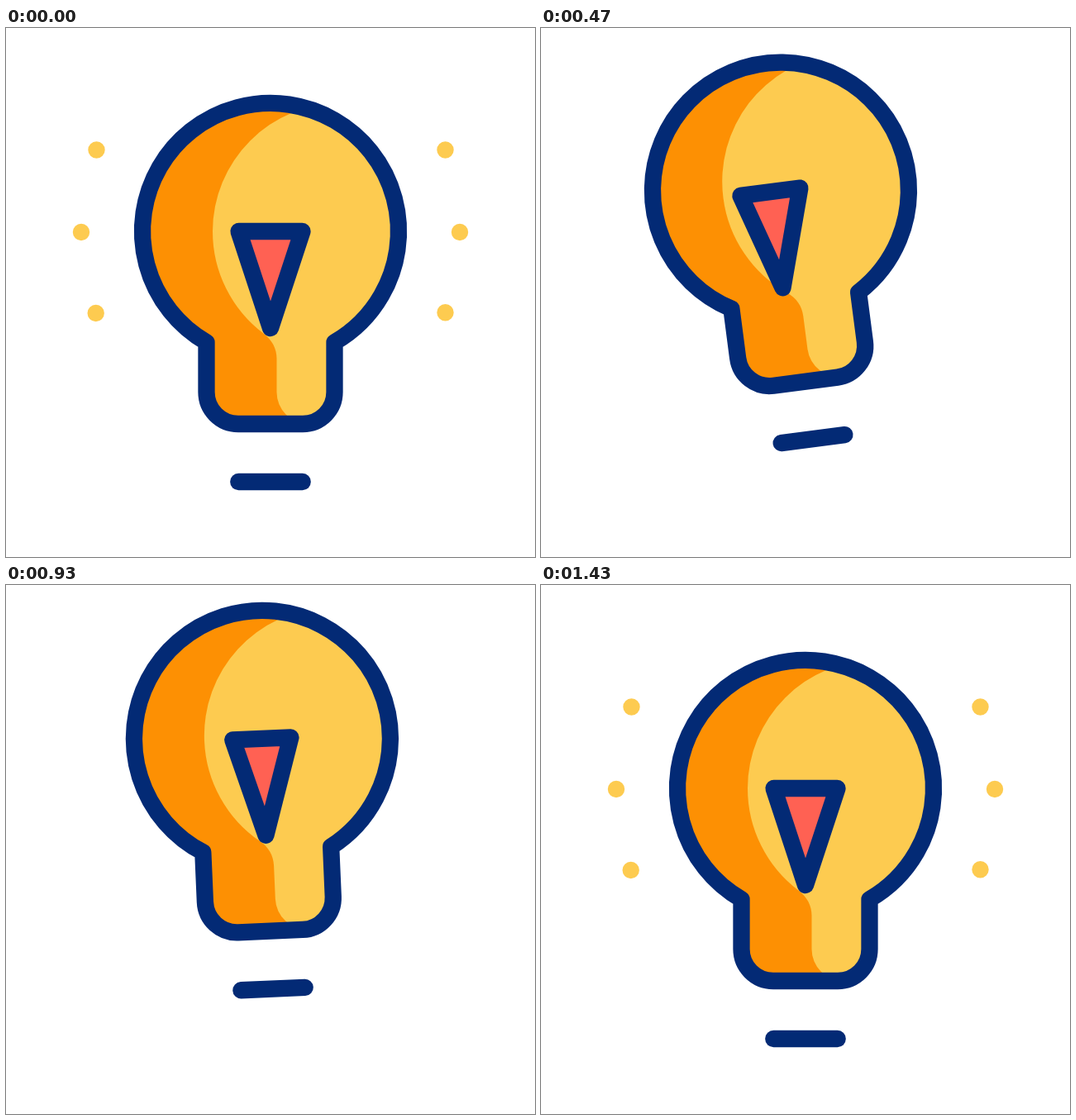
An HTML page with a canvas that plays this animation: 640 by 640 pixels, repeating every 1.67 s.

```html
<!DOCTYPE html>
<html lang="en">
<head>
<meta charset="utf-8">
<title>Light bulb</title>
<style>
html, body { margin: 0; width: 100%; height: 100%; overflow: hidden; background: #fff; }
canvas { display: block; width: 640px; height: 640px; }
</style>
</head>
<body>
<canvas id="stage" width="640" height="640"></canvas>
<script>
const ctx = document.getElementById('stage').getContext('2d');
const LOOP = 1670, FPS = 30, BLINK = 50 / 7;
const NAVY = '#032a75', YELLOW = '#fdcb50', ORANGE = '#fd9003', RED = '#ff6153';
const CX = 320, CY = 246, RADIUS = 155, BASE = 479, NECK = 77.5, CORNER = 38.5;

// Keys are [frame, value] pairs, eased in and out between neighbours.
const lift = [[0, 0], [10.8, -59.5], [11.4, -59.5], [21.5, 0], [29.5, -65], [43, 0]];
const tilt = [[0, 0], [7.6, -8.3], [12.9, -8.3], [19.4, 7], [25.8, -3.9], [32, 1.52], [43, 0]];
const flip = [[0, 1], [15.9, -1], [30.1, 1]];
const slide = [[0, 0], [15.9, -13], [30.1, 0]];

const dots = [[109.5, 147.5], [91, 247], [108.7, 345], [531.5, 147.5], [549, 247], [531.5, 344.3]];

function ease(x) {
  const k = 0.42;
  let lo = 0, hi = 1;
  for (let i = 0; i < 24; i++) {
    const t = (lo + hi) / 2, r = 1 - t;
    const bx = 3 * k * t * r * r + 3 * (1 - k) * t * t * r + t * t * t;
    if (bx < x) lo = t; else hi = t;
  }
  return lo * lo * (3 - 2 * lo);
}

function valueAt(keys, frame) {
  const next = keys.findIndex(key => key[0] > frame);
  if (next < 0) return keys[keys.length - 1][1];
  const [f0, v0] = keys[next - 1], [f1, v1] = keys[next];
  return v0 + (v1 - v0) * ease((frame - f0) / (f1 - f0));
}

function makeBody() {
  const path = new Path2D();
  const left = CX - NECK, right = CX + NECK;
  const join = Math.acos(NECK / RADIUS);
  path.arc(CX, CY, RADIUS, Math.PI - join, join);
  path.arcTo(right, BASE, CX, BASE, CORNER);
  path.arcTo(left, BASE, left, CY, CORNER);
  path.closePath();
  return path;
}

function makeLight() {
  const path = new Path2D();
  path.moveTo(500, 91);
  path.arc(405, CY, RADIUS, -Math.PI / 2, Math.atan2(124, -93), true);
  path.bezierCurveTo(322, 377.5, 327.5, 388, 327.5, 400);
  path.lineTo(327.5, 440.5);
  path.arc(366, 440.5, CORNER, Math.PI, Math.PI / 2, true);
  path.lineTo(500, BASE);
  path.closePath();
  return path;
}

const body = makeBody(), light = makeLight();

function fill(path, color) {
  ctx.fillStyle = color;
  ctx.fill(path);
}

function drawDots() {
  const path = new Path2D();
  for (const [x, y] of dots) {
    path.moveTo(x + 10, y);
    path.arc(x, y, 10.2, 0, Math.PI * 2);
  }
  fill(path, YELLOW);
}

function drawBulb(frame) {
  ctx.save();
  ctx.translate(CX, BASE + valueAt(lift, frame));
  ctx.rotate(valueAt(tilt, frame) * Math.PI / 180);
  ctx.translate(-CX, -BASE);

  fill(body, ORANGE);
  ctx.save();
  ctx.clip(body);
  fill(light, YELLOW);
  ctx.restore();
  ctx.stroke(body);

  const mid = CX + valueAt(slide, frame), half = 38.5 * valueAt(flip, frame);
  const filament = new Path2D();
  filament.moveTo(mid - half, CY);
  filament.lineTo(mid + half, CY);
  filament.lineTo(mid, 363);
  filament.closePath();
  fill(filament, RED);
  ctx.stroke(filament);

  const bar = new Path2D();
  bar.moveTo(CX - 38.7, 549);
  bar.lineTo(CX + 38.7, 549);
  ctx.stroke(bar);
  ctx.restore();
}

function draw(ms) {
  const frame = Math.floor((ms % LOOP + 4) * FPS / 1000);
  ctx.fillStyle = '#fff';
  ctx.fillRect(0, 0, 640, 640);
  ctx.strokeStyle = NAVY;
  ctx.lineWidth = 20.3;
  ctx.lineJoin = ctx.lineCap = 'round';
  if (Math.floor(frame / BLINK) % 2 === 0) drawDots();
  drawBulb(frame);
}

const start = performance.now();
function tick() {
  draw(performance.now() - start);
  requestAnimationFrame(tick);
}
tick();
</script>
</body>
</html>
```
